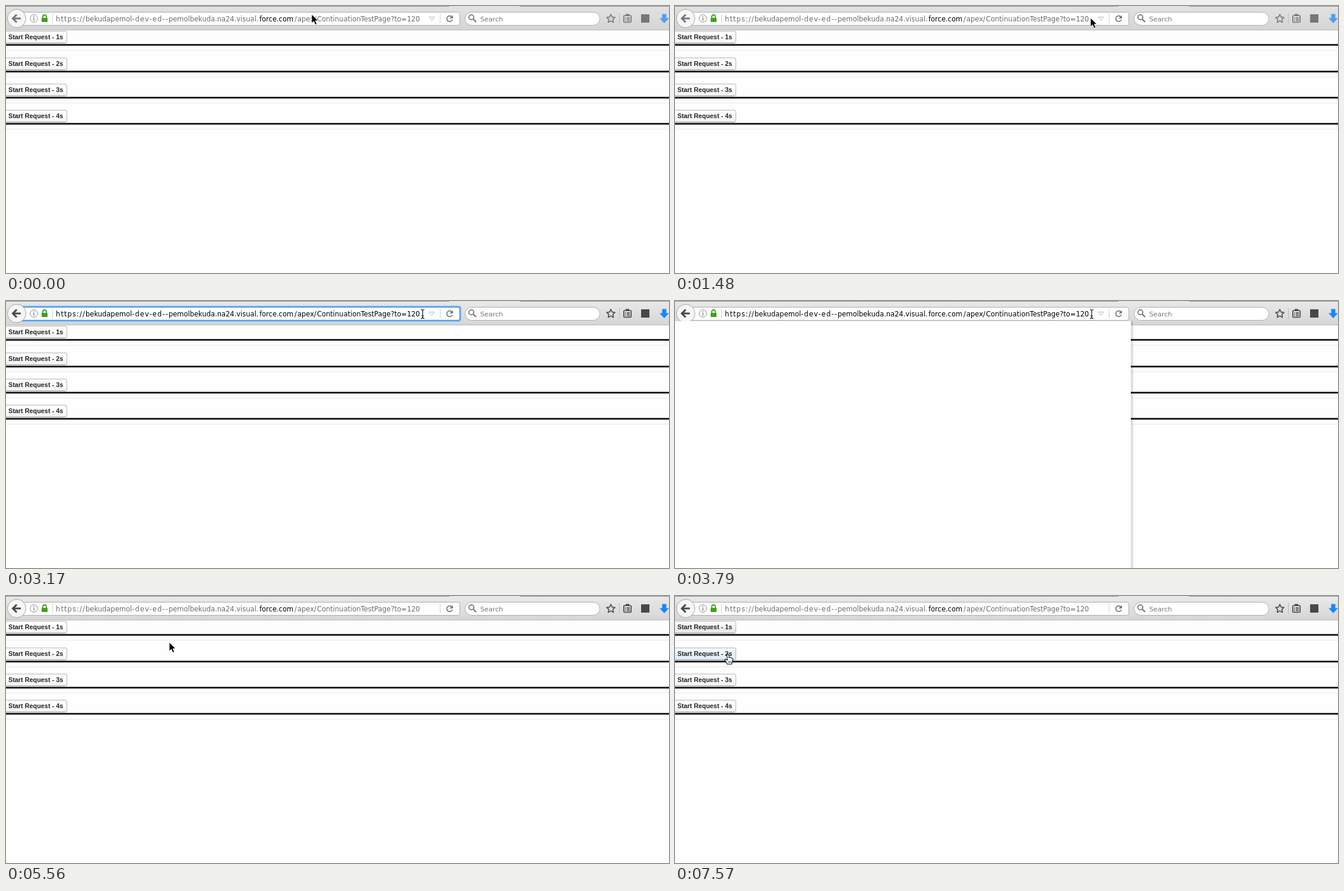
An HTML page for the animation above (8000 ms loop, 1117 px wide and 450 px high).

```html
<!DOCTYPE html>
<html lang="en">
<head>
<meta charset="utf-8">
<title>Continuation test page</title>
<style>
  html, body { margin: 0; width: 100%; height: 100%; overflow: hidden; background: #fefefe; }
  svg { display: block; width: 1117px; height: 450px; }
  text { white-space: pre; }
  .ui { font: 11.5px "DejaVu Sans", sans-serif; }
  .wide { letter-spacing: 1.1px; }
  .label { font: bold 10.85px "Liberation Sans", Arial, sans-serif; fill: #222; }
  .bar { fill: url(#barIdle); }
  .icon { fill: none; stroke: #777; }
  .solid { fill: #777; }
  .download { fill: #4d9ff0; }
  .dim { fill: #6c6c6c; }
  .host { fill: #000; }
  .field { fill: #fff; stroke: #acacac; }
  .ring, .selection, .caret, .panel { visibility: hidden; }
  .active .bar { fill: url(#barActive); }
  .active .icon { stroke: #484848; }
  .active .solid { fill: #484848; }
  .active .download { fill: #1787fb; }
  .editing .dim { fill: #000; }
  .focus .ring, .selected .selection, .blink .caret, .popup .panel { visibility: visible; }
  .away .marker { visibility: hidden; }
  .button { fill: url(#face); stroke: #b4b4b4; }
  .button.used { fill: url(#faceUsed); }
  .button.hover { fill: url(#faceHover); stroke: #a3b2bf; }
  .pointer { visibility: hidden; }
  .pointer.on { visibility: visible; }
</style>
</head>
<body>
<svg id="stage" viewBox="0 0 1117 450" xmlns="http://www.w3.org/2000/svg">
  <defs>
    <linearGradient id="barIdle" x2="0" y2="1">
      <stop stop-color="#e2e2e2"/><stop offset="1" stop-color="#d5d5d5"/>
    </linearGradient>
    <linearGradient id="barActive" x2="0" y2="1">
      <stop stop-color="#e9e9e9"/><stop offset="1" stop-color="#d6d6d6"/>
    </linearGradient>
    <linearGradient id="face" x2="0" y2="1">
      <stop offset=".4" stop-color="#fff"/><stop offset="1" stop-color="#f0f0f0"/>
    </linearGradient>
    <linearGradient id="faceUsed" x2="0" y2="1">
      <stop stop-color="#fcfcfc"/><stop offset="1" stop-color="#e5e5e5"/>
    </linearGradient>
    <linearGradient id="faceHover" x2="0" y2="1">
      <stop stop-color="#f7fbff"/><stop offset="1" stop-color="#deebf7"/>
    </linearGradient>
  </defs>

  <rect width="1117" height="450" fill="#fefefe"/>
  <g id="rows"></g>

  <!-- toolbar -->
  <rect class="bar" width="1117" height="40"/>
  <path d="M0 .5H747M866 .5H1117" stroke="#8e8e8e"/>
  <path d="M0 40.5H1117" stroke="#b9b9b9"/>

  <!-- address field -->
  <path class="field" d="M24 10.5H761.5q3 0 3 3V29.5q0 3-3 3H24z"/>
  <g class="ring" fill="none">
    <path d="M24 9.5H762q3.5 0 3.5 3.5V30q0 3.5-3.5 3.5H24z" stroke="#a6cdf4" stroke-width="4"/>
    <path d="M24 10H762q3 0 3 3V30q0 3-3 3H24z" stroke="#559de6" stroke-width="2"/>
  </g>
  <circle cx="18" cy="21" r="15.5" fill="#f6f6f6" stroke="#a3a3a3"/>
  <path class="icon" d="M18 14.5L11.5 21L18 27.5M12 21H25" stroke-width="3.1"/>
  <circle cx="47" cy="21" r="6.3" fill="none" stroke="#8a8a8a"/>
  <path d="M47 17.2v1.7M47 20v4.8" stroke="#858585" stroke-width="1.5"/>
  <rect x="60" y="20" width="10" height="7" rx="1" fill="#43a01d"/>
  <path d="M62 20.5V18a3 3 0 0 1 6 0v2.5" fill="none" stroke="#43a01d" stroke-width="1.8"/>
  <path d="M78.5 13V29M731.5 13V29" stroke="#d2d2d2"/>
  <rect class="selection" x="84" y="13" width="618" height="17" fill="#b2d6fd"/>
  <text class="ui dim" x="84" y="26"><tspan class="wide">https://</tspan>bekudapemol<tspan class="wide">-dev-ed--</tspan>pemolbekuda.na24.visual.<tspan class="host" x="427">force.com</tspan><tspan class="wide" x="486">/</tspan>apex<tspan class="wide">/</tspan>ContinuationTestPage?to=120</text>
  <rect class="caret" x="702" y="14" width="1" height="15" fill="#111"/>
  <path class="marker" d="M713 18.5H722L717.5 25z" fill="#f6f6f6" stroke="#c2c2c2"/>
  <path d="M751.2 18.4A4.8 4.8 0 1 0 752 23" fill="none" stroke="#777" stroke-width="1.7"/>
  <path d="M753 15.5V21H747.5z" fill="#777"/>

  <!-- search field and tools -->
  <rect class="field" x="773.5" y="10.5" width="227" height="22" rx="11"/>
  <circle cx="784" cy="19" r="4.2" fill="none" stroke="#777" stroke-width="1.8"/>
  <path d="M787 22L792 27" stroke="#777" stroke-width="2.3"/>
  <text class="ui" x="799" y="26" fill="#777" style="font-size:11.2px">Search</text>
  <path class="icon" stroke-width="1.6" stroke-linejoin="round" d="M1019 14L1021.1 18.6L1026.1 19.2L1022.4 22.6L1023.4 27.6L1019 25.1L1014.6 27.6L1015.6 22.6L1011.9 19.2L1016.9 18.6z"/>
  <path d="M1033.5 12V30" stroke="#bdbdbd"/>
  <rect class="icon" x="1040.8" y="16" width="12.4" height="11.5" rx="1.5" stroke-width="1.7"/>
  <path class="icon" stroke-width="1.4" d="M1043 19.7h1.5M1046 19.7h5M1043 22.2h1.5M1046 22.2h5M1043 24.7h1.5M1046 24.7h5"/>
  <rect class="solid" x="1044" y="13.5" width="6" height="3.5"/>
  <rect class="solid" x="1070" y="14" width="14" height="14"/>
  <path class="download" d="M1105.5 13.5h7v7h4.5L1109 29L1101 20.5h4.5z"/>

  <g class="panel">
    <rect y="34" width="772" height="416" fill="#000" opacity=".12"/>
    <rect y="34" width="768" height="416" fill="#fefefe"/>
  </g>

  <!-- pointers, each with its hot spot at the origin -->
  <g class="pointer" id="arrow">
    <path d="M0 0V15L3.6 11.8L6 17.5L8.8 16.3L6.4 10.8H11z" fill="#000" stroke="#fff" stroke-width=".9"/>
  </g>
  <g class="pointer" id="beam" fill="none">
    <path d="M-3-7.5Q0-7.5 0-5V5Q0 7.5-3 7.5M3-7.5Q0-7.5 0-5M0 5Q0 7.5 3 7.5M-2 3H2" stroke="#fff" stroke-width="2.6"/>
    <path d="M-3-7.5Q0-7.5 0-5V5Q0 7.5-3 7.5M3-7.5Q0-7.5 0-5M0 5Q0 7.5 3 7.5M-2 3H2" stroke="#111" stroke-width="1.2"/>
  </g>
  <g class="pointer" id="hand">
    <path d="M-1.4 1Q0-1 1.4 1L2.2 6Q3.6 4.8 4.6 6.2Q6 5.4 6.8 7Q8.4 6.6 8.4 8.6L7.6 13L6.4 17H-1L-2.4 13.6L-5.4 9.8Q-5.2 7.6-3 8.8L-.8 10.4z" fill="#fff" stroke="#111" stroke-width="1.1" stroke-linejoin="round"/>
    <path d="M1 11.5V15M3.2 11.5V15M5.3 11.5V15" stroke="#111" stroke-width=".8"/>
  </g>
</svg>
<script>
  const LOOP = 8000;
  const stage = document.getElementById("stage");

  document.getElementById("rows").innerHTML = [0, 45, 89, 133].map((dy, i) => `
    <g transform="translate(0 ${dy})">
      <rect class="button" x="-4.5" y="42.5" width="107" height="20" rx="2.5"/>
      <path d="M0 62.5H100" stroke="#8c8c8c"/>
      <text class="label" x="4" y="56">Start Request - ${i + 1}s</text>
      <rect y="64" width="1117" height="3" fill="#222"/>
      <rect y="74" width="1117" height="1" fill="#e8e8e8"/>
    </g>`).join("");
  const buttons = stage.querySelectorAll(".button");
  const pointers = stage.querySelectorAll(".pointer");

  // Start time and x, y of every pointer stop
  const stops = [
    [0, 515, 14], [120, 690, 16], [270, 698, 17], [380, 710, 19], [490, 721, 20],
    [600, 714, 20], [720, 707, 20], [1130, 706, 20], [1250, 704, 20], [1360, 702, 20],
    [1480, 700, 20], [1950, 702, 22], [4860, 680, 28], [4980, 650, 40], [5090, 560, 58],
    [5210, 460, 70], [5330, 370, 76], [5440, 310, 78], [5560, 275, 78], [5680, 262, 74],
    [5800, 220, 68], [5910, 170, 62], [6030, 125, 57], [6150, 95, 53], [6260, 84, 50],
    [6860, 90, 54], [6980, 110, 66], [7090, 130, 82], [7210, 133, 95], [7330, 122, 100],
    [7450, 101, 99], [7570, 89, 98]
  ];

  // Spans in which each state holds
  const states = {
    active: [1720, LOOP],
    editing: [1720, 4390],
    focus: [1720, 3790],
    selected: [1720, 2210],
    blink: [2330, 3170],
    popup: [3790, 4270],
    away: [4980, LOOP]
  };
  const during = (t, [from, to]) => t >= from && t < to;

  function pointerAt(t) {
    if (during(t, [1950, 4980])) return "beam";
    if (during(t, [6150, 6980]) || t >= 7450) return "hand";
    return "arrow";
  }

  function draw(t) {
    for (const name in states) stage.classList.toggle(name, during(t, states[name]));
    buttons[0].classList.toggle("hover", during(t, [6150, 6980]));
    buttons[0].classList.toggle("used", t >= 6980);
    buttons[1].classList.toggle("hover", t >= 7450);

    const [, x, y] = stops.filter(stop => stop[0] <= t).pop();
    const shown = pointerAt(t);
    for (const p of pointers) {
      p.classList.toggle("on", p.id === shown);
      p.setAttribute("transform", `translate(${x} ${y})`);
    }
  }

  const start = performance.now();
  function tick() {
    draw((performance.now() - start) % LOOP);
    requestAnimationFrame(tick);
  }
  tick();
</script>
</body>
</html>
```
